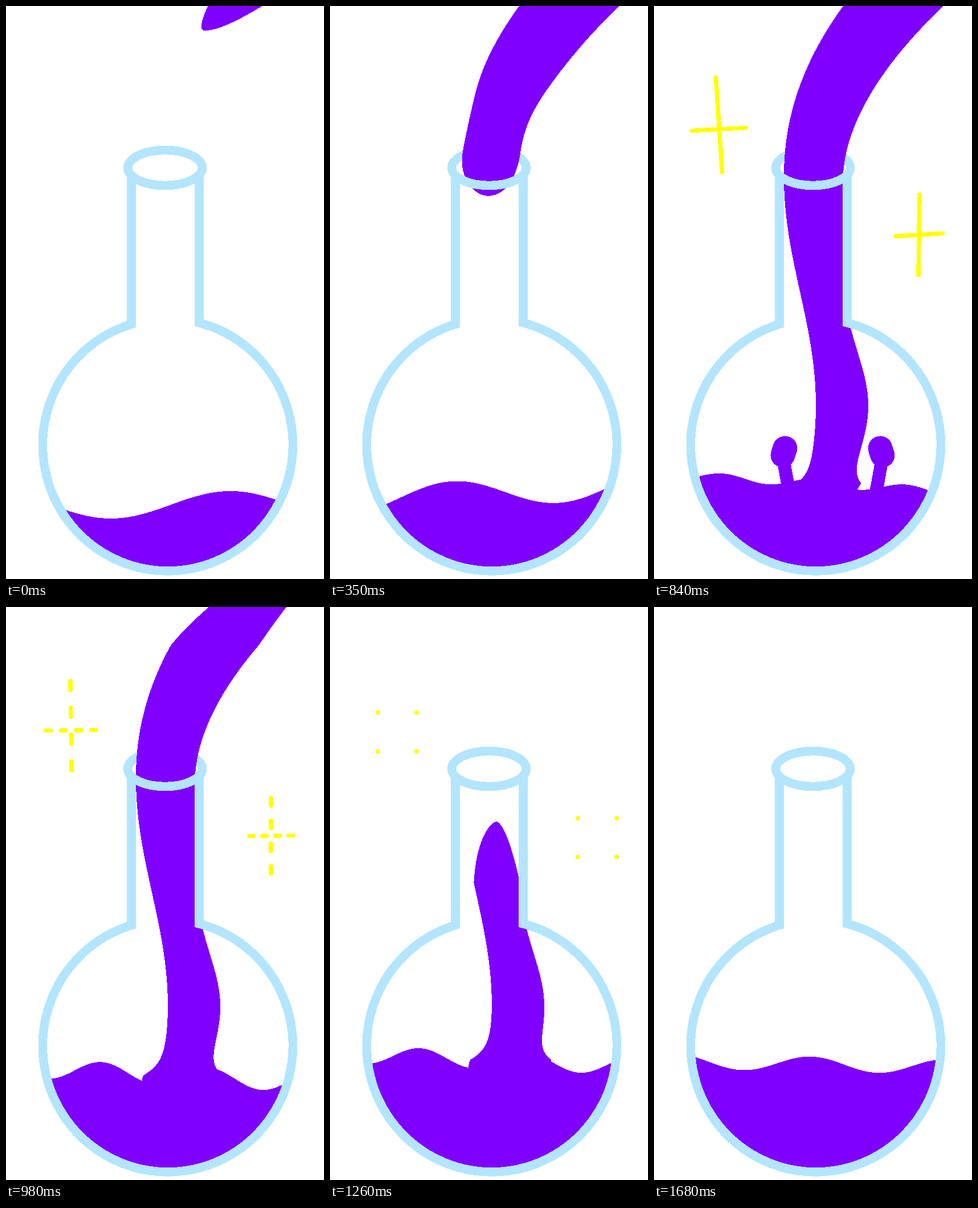
Animation, 558 px wide and 1004 px high, one loop 1750 ms. Source, as an HTML page:

```html
<!DOCTYPE html>
<html lang="en">
<head>
<meta charset="utf-8">
<title>Flask</title>
<style>
  html, body { margin: 0; height: 100%; overflow: hidden; background: #fff; }
  svg { display: block; width: 100vw; height: 100vh; shape-rendering: crispEdges; }
  .glass { fill: none; stroke: #b3e5ff; stroke-width: 15.5; }
  .liquid { fill: #7f00ff; }
  #splash { stroke: #7f00ff; stroke-linecap: round; }
  #spark { fill: none; stroke: #ff0; stroke-width: 7.5; stroke-linecap: round; }
</style>
</head>
<body>
<svg viewBox="0 0 558 1004">
  <clipPath id="inside">
    <path d="M0 0H558V290H339V555A219.5 221 0 1 1 220 557.5V290H0Z"/>
  </clipPath>
  <ellipse class="glass" cx="279" cy="283.5" rx="65.3" ry="31"/>
  <g class="liquid" clip-path="url(#inside)">
    <path id="surface"/>
    <path id="pour"/>
    <g id="splash">
      <g id="arm">
        <path d="M230 775L226 787" stroke-width="43"/>
        <path d="M226 790L237 850" stroke-width="23"/>
      </g>
      <use href="#arm" transform="matrix(-1 0 0 1 627 0)"/>
    </g>
  </g>
  <path class="glass" d="M220 297V557.5A219.5 221 0 1 0 339 555V297"/>
  <path class="glass" d="M213.7 283.5A65.3 31 0 0 0 344.3 283.5"/>
  <path id="spark"/>
</svg>
<script>
const FRAME = 70, COUNT = 25;
const { PI, sin, cos, exp, sqrt, min, max } = Math;
const $ = id => document.getElementById(id);
const clamp = x => min(1, max(0, x));

// frame, level, height, crest x, wavelength, tilt
const waves = [
  [0, 874, 24, 394, 420, 0],
  [5, 853, 24, 215, 370, -.055],
  [9, 855, 11, 280, 275, .01],
  [12, 836, 7, 120, 160, .06],
  [16, 805, 27, 215, 215, .045],
  [20, 783, 4, 100, 160, .04],
  [24, 801, 13, 275, 237, .02]
];

function waveAt(f) {
  const i = max(1, waves.findIndex(w => w[0] >= f));
  const a = waves[i - 1], b = waves[i];
  const u = (f - a[0]) / (b[0] - a[0]);
  return a.map((v, k) => v + (b[k] - v) * u);
}

function surfacePath([, level, height, crest, length, tilt]) {
  let d = 'M60 1004';
  for (let x = 60; x <= 512; x += 4) {
    const y = level - height * cos(2 * PI * (x - crest) / length) + tilt * (x - 284);
    d += `L${x} ${y}`;
  }
  return d + 'V1004Z';
}

// Full stream: bends in from the upper right, then swings right below the neck
function streamEdges(y) {
  const above = max(0, (300 - y) / 300);
  const swing = sin(PI / 2 * max(0, (y - 300) / 400));
  return [
    228 + 104 * above ** 2.1 + 56 * swing ** 2,
    332 + 176 * above ** 1.8 + 44 * swing ** 8
  ];
}

function pourPath(f, level) {
  const head = 43 + 40.6 * f + 3.47 * f * f;
  const tail = 126 + 125 * (f - 16);
  const headLength = max(75, 300 - head * .7);
  const tailLength = max(65, 170 - tail / 6);
  const lean = min(.5, .25 + head / 1500);
  const top = max(-20, tail), bottom = min(head, 870);
  if (top >= bottom) return '';

  const left = [], right = [];
  const steps = 120;
  for (let i = 0; i <= steps; i++) {
    const y = top + (bottom - top) * (1 - cos(PI * i / steps)) / 2;
    const [l, r] = streamEdges(y);
    const flare = 32 * exp(-max(0, level - y) / 18);
    const full = r - l + 2 * flare;
    const below = head - y;
    const neck = 1 - .45 * min(1, (head / 690) ** 2) * exp(-(((below - 130) / 70) ** 2));
    const front = neck * sqrt(1 - (1 - clamp(below / headLength)) ** 2);
    const back = clamp((y - tail) / tailLength) ** .6;
    const x = l - flare + full * ((1 - front) * lean + front * (1 - back) * .6);
    left.push(`${x} ${y}`);
    right.unshift(`${x + full * front * back} ${y}`);
  }
  return 'M' + left.concat(right).join('L') + 'Z';
}

const stars = [
  { x: 114, y: 208, w: 94, h: 166, drop: 8, tilt: 11 },
  { x: 465, y: 401, w: 82, h: 141, drop: 0, tilt: -2 }
];

// A line with the given half extents, whole or cut into four dashes
function line(x, y, dx, dy, dashed) {
  const at = t => `${x + dx * (2 * t - 1)} ${y + dy * (2 * t - 1)}`;
  if (!dashed) return `M${at(0)}L${at(1)}`;
  return [0, .3, .6, .9].map(t => `M${at(t)}L${at(t + .1)}`).join('');
}

function starPath({ x, y, w, h, drop, tilt }, f) {
  if (f < 11 || f > 21) return '';
  if (f > 17) {
    return [-1, 1].flatMap(i => [-1, 1].map(j =>
      `M${x + 4 + i * 34} ${y + drop + 3 + j * 34}h.01`)).join('');
  }
  const dashed = f > 13, size = dashed ? .47 : .5, skew = dashed ? .1 : .5;
  return line(x, y, tilt * skew, h * size, dashed) +
    line(x, y + drop, w * size, -5 * skew, dashed);
}

function draw(now) {
  const f = Math.floor(now / FRAME) % COUNT;
  const wave = waveAt(f);
  $('surface').setAttribute('d', surfacePath(wave));
  $('pour').setAttribute('d', pourPath(f, wave[1]));
  const grow = f > 10 && f < 14 ? sin(PI * (f - 10) / 4) : 0;
  $('splash').setAttribute('transform', `translate(314 850) scale(${grow}) translate(-314 -850)`);
  $('spark').setAttribute('d', stars.map(s => starPath(s, f)).join(''));
  requestAnimationFrame(draw);
}
draw(0);
</script>
</body>
</html>
```
